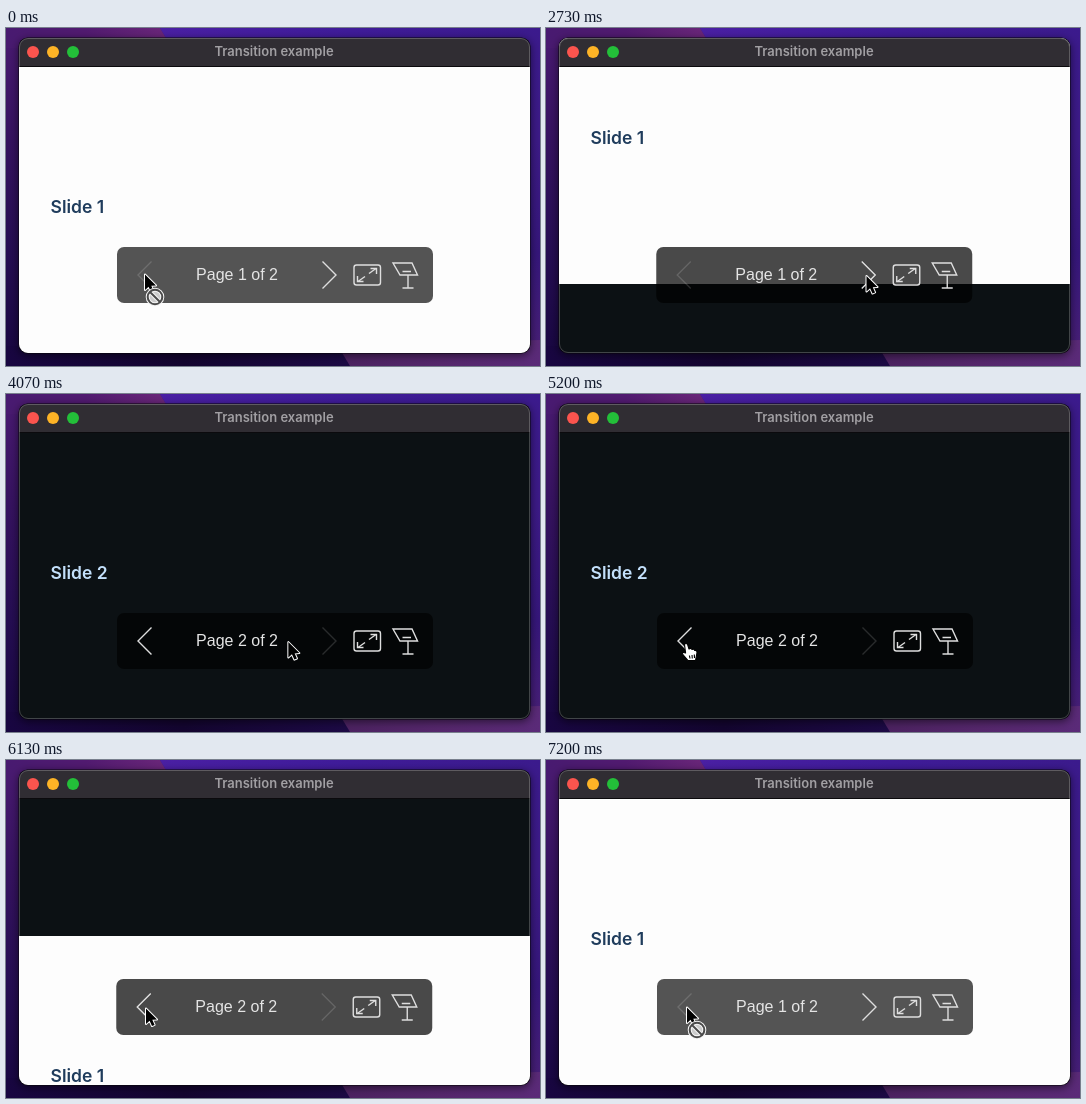
An HTML page with a canvas that plays this animation: 534 px wide and 338 px high, repeating every 7.27 s.

```html
<!DOCTYPE html>
<html lang="en">
<head>
<meta charset="utf-8">
<title>Transition example</title>
<style>
html, body { margin: 0; width: 100%; height: 100%; overflow: hidden; background: #1c0b40; }
canvas { display: block; width: 534px; height: 338px; }
</style>
</head>
<body>
<canvas id="stage"></canvas>
<script>
const W = 534, H = 338, LOOP = 7270;
const WIN = { x: 13, y: 10, w: 511, h: 315, r: 9 };
const TOP = 39, VIEW = 286;
const UI = 'Inter, "Helvetica Neue", sans-serif';
const LABEL = '"Liberation Sans", Arial, sans-serif';
const PUSH = 7.77;              // push length in ticks of 1/15 s
const CLICKS = [39.13, 87.96];  // push start, in ticks

const canvas = document.getElementById('stage');
const dpr = window.devicePixelRatio || 1;
canvas.width = W * dpr;
canvas.height = H * dpr;
const c = canvas.getContext('2d');

const clamp = v => Math.max(0, Math.min(1, v));
const smooth = v => { v = clamp(v); return v * v * (3 - 2 * v); };
const mix = (a, b, k) => a + (b - a) * k;

function fillRect(x, y, w, h, color) {
  c.fillStyle = color;
  c.fillRect(x, y, w, h);
}

function gradient(x0, y0, x1, y1, ...colors) {
  const g = c.createLinearGradient(x0, y0, x1, y1);
  colors.forEach((col, i) => g.addColorStop(i / (colors.length - 1), col));
  return g;
}

function rounded(x, y, w, h, r) {
  c.beginPath();
  c.roundRect(x, y, w, h, r);
}

function trace(points, closed) {
  c.beginPath();
  for (let i = 0; i < points.length; i += 2) c.lineTo(points[i], points[i + 1]);
  if (closed) c.closePath();
}

function line(...points) {
  trace(points);
  c.stroke();
}

function disc(x, y, r, color) {
  c.fillStyle = color;
  c.beginPath();
  c.arc(x, y, r, 0, 7);
  c.fill();
}

function text(str, x, y, font, color, align = 'left') {
  c.font = font;
  c.fillStyle = color;
  c.textAlign = align;
  c.fillText(str, x, y);
}

function wallpaper() {
  fillRect(0, 0, W, H, gradient(0, 0, 0, H, '#4a1a72', '#35125f', '#250d52', '#170640'));
  trace([0, 0, 154, 0, 166, 20, 0, 20], true);
  c.fillStyle = gradient(0, 0, 160, 0, '#481a70', '#511a70', '#6a2679');
  c.fill();
  trace([154, 0, W, 0, W, 20, 166, 20], true);
  c.fillStyle = gradient(154, 0, W, 0, '#4a1fa4', '#3f1b99', '#3b1a8c');
  c.fill();
  fillRect(515, 8, 19, 330, gradient(0, 0, 0, H, '#3b1a8c', '#3c1a86', '#35167a', '#4a2075'));
  fillRect(0, 318, W, 20, gradient(0, 0, W, 0, '#180641', '#13042f', '#1d0a47', '#231054'));
  trace([332, 318, W, 312, W, H, 344, H], true);
  c.fillStyle = gradient(332, 0, W, 0, '#4b2260', '#55276c', '#5a2a78');
  c.fill();
}

function slide(dark, y) {
  fillRect(WIN.x, y, WIN.w, VIEW + 1, dark ? '#0c1114' : '#fdfdfd');
  text(dark ? 'Slide 2' : 'Slide 1', 44.5, y + 146, '600 17.5px ' + UI, dark ? '#c3e0fb' : '#1f3c5c');
}

function frameTop() {
  fillRect(WIN.x, WIN.y, WIN.w, 28, '#302d33');
  fillRect(WIN.x, 38, WIN.w, 1, '#0b0a0d');
  disc(27, 24, 6, '#fb544e');
  disc(47, 24, 6, '#fdb326');
  disc(67, 24, 6, '#23bf39');
  text('Transition example', 268, 28, '600 13px ' + UI, '#a19fa3', 'center');
}

function controls(page, moving) {
  c.save();
  if (moving) c.translate(-0.75, 0);
  rounded(111, 219, 316, 56, 7);
  c.fillStyle = `rgba(0,0,0,${moving ? 0.71 : 0.665})`;
  c.fill();
  text(`Page ${page} of 2`, 231, 252, '16px ' + LABEL, '#e4e4e4', 'center');

  const on = '#dedede', off = 'rgba(255,255,255,0.15)';
  c.lineWidth = 1.4;
  c.strokeStyle = page > 1 ? on : off;
  line(145.5, 233.5, 132, 247, 145.5, 260.5);
  c.strokeStyle = page < 2 ? on : off;
  line(316.5, 233.5, 330, 247, 316.5, 260.5);

  c.strokeStyle = on;
  rounded(348, 237, 26.5, 20, 2.5);
  c.stroke();
  line(363, 245.5, 370, 240.5);
  line(364.5, 240.5, 370.5, 240.5, 370.5, 246);
  line(359, 248.5, 352, 253.5);
  line(351.5, 248, 351.5, 253.5, 357.5, 253.5);

  trace([387, 235, 406, 235, 411.5, 247, 394, 247], true);
  c.stroke();
  line(396.5, 243.5, 405, 243.5);
  line(402, 247, 402, 260);
  line(396.5, 260, 407.5, 260);
  c.restore();
}

function arrow() {
  trace([0, 0, 0, 15.5, 3.6, 12.2, 6, 17.5, 8.6, 16.4, 6.3, 11.3, 11, 11], true);
  c.lineWidth = 2;
  c.strokeStyle = '#fff';
  c.stroke();
  c.fillStyle = '#000';
  c.fill();
}

function ban() {
  const ring = (width, color) => {
    c.lineWidth = width;
    c.strokeStyle = color;
    c.beginPath();
    c.arc(10, 22.5, 7.3, 0, 7);
    c.stroke();
    line(5, 17.5, 15, 27.5);
  };
  disc(10, 22.5, 7, 'rgba(225,225,225,0.85)');
  ring(4, '#f4f4f4');
  ring(2, '#4a4a4a');
}

function hand() {
  c.beginPath();
  c.moveTo(-1.5, 1);
  c.quadraticCurveTo(0, -1, 1.6, 1);
  c.lineTo(3, 5.5);
  c.quadraticCurveTo(5, 4, 6, 6);
  c.quadraticCurveTo(8, 5, 8.7, 7);
  c.quadraticCurveTo(11, 6.5, 11, 9);
  c.lineTo(10.3, 13);
  c.lineTo(9.5, 17);
  c.lineTo(2, 17);
  c.lineTo(-3.5, 10.5);
  c.quadraticCurveTo(-3.5, 8, -0.4, 9.5);
  c.closePath();
  c.fillStyle = '#fff';
  c.fill();
  c.strokeStyle = '#000';
  c.lineWidth = 1.1;
  c.stroke();
  line(3.4, 12, 4, 15);
  line(6, 11.5, 6.3, 15);
  line(8.3, 11, 8.5, 14.5);
}

function pointer(t, page, moving) {
  const out = smooth((t - 500) / 850);
  const back = smooth((t - 3800) / 900);
  const end = smooth((t - 6300) / 500);
  const x = mix(mix(139, 320.5, out), 140, back) + end;
  const y = mix(mix(246.5, 248, out), 248.5, back) - end;
  const overPrev = x < 165, overNext = x > 303;
  const live = page === 1 ? overNext : overPrev;
  c.save();
  c.translate(x, y);
  c.lineJoin = 'round';
  if (moving || !(overPrev || overNext)) arrow();
  else if (live) { c.translate(0, 1); hand(); }
  else { arrow(); ban(); }
  c.restore();
}

function draw(now) {
  const tick = Math.floor((now % LOOP + 4) * 0.015);
  const t = tick * 200 / 3;
  const progress = CLICKS.map(s => clamp((tick - s) / PUSH));
  const active = progress.findIndex(p => p > 0 && p < 1);
  const moving = active >= 0;
  const page = progress[0] === 1 && progress[1] < 1 ? 2 : 1;

  c.setTransform(dpr, 0, 0, dpr, 0, 0);
  wallpaper();

  c.save();
  c.shadowColor = 'rgba(0,0,0,0.55)';
  c.shadowBlur = 9 * dpr;
  c.shadowOffsetY = 2 * dpr;
  rounded(WIN.x - 0.5, WIN.y - 0.5, WIN.w + 1, WIN.h + 1, WIN.r);
  c.fillStyle = '#08060c';
  c.fill();
  c.restore();

  c.save();
  rounded(WIN.x, WIN.y, WIN.w, WIN.h, WIN.r);
  c.clip();
  const shift = moving ? Math.round(progress[active] * VIEW) : 0;
  slide(page === 2, TOP - shift);
  if (moving) slide(page === 1, TOP + VIEW - shift);
  frameTop();
  controls(page, moving);
  c.restore();

  c.lineWidth = 1;
  c.strokeStyle = 'rgba(255,255,255,0.22)';
  rounded(WIN.x + 0.5, WIN.y + 0.5, WIN.w - 1, WIN.h - 1, WIN.r - 0.5);
  c.stroke();

  pointer(t, page, moving);
}

const start = performance.now();
function loop() {
  draw(performance.now() - start);
  requestAnimationFrame(loop);
}
loop();
</script>
</body>
</html>
```
